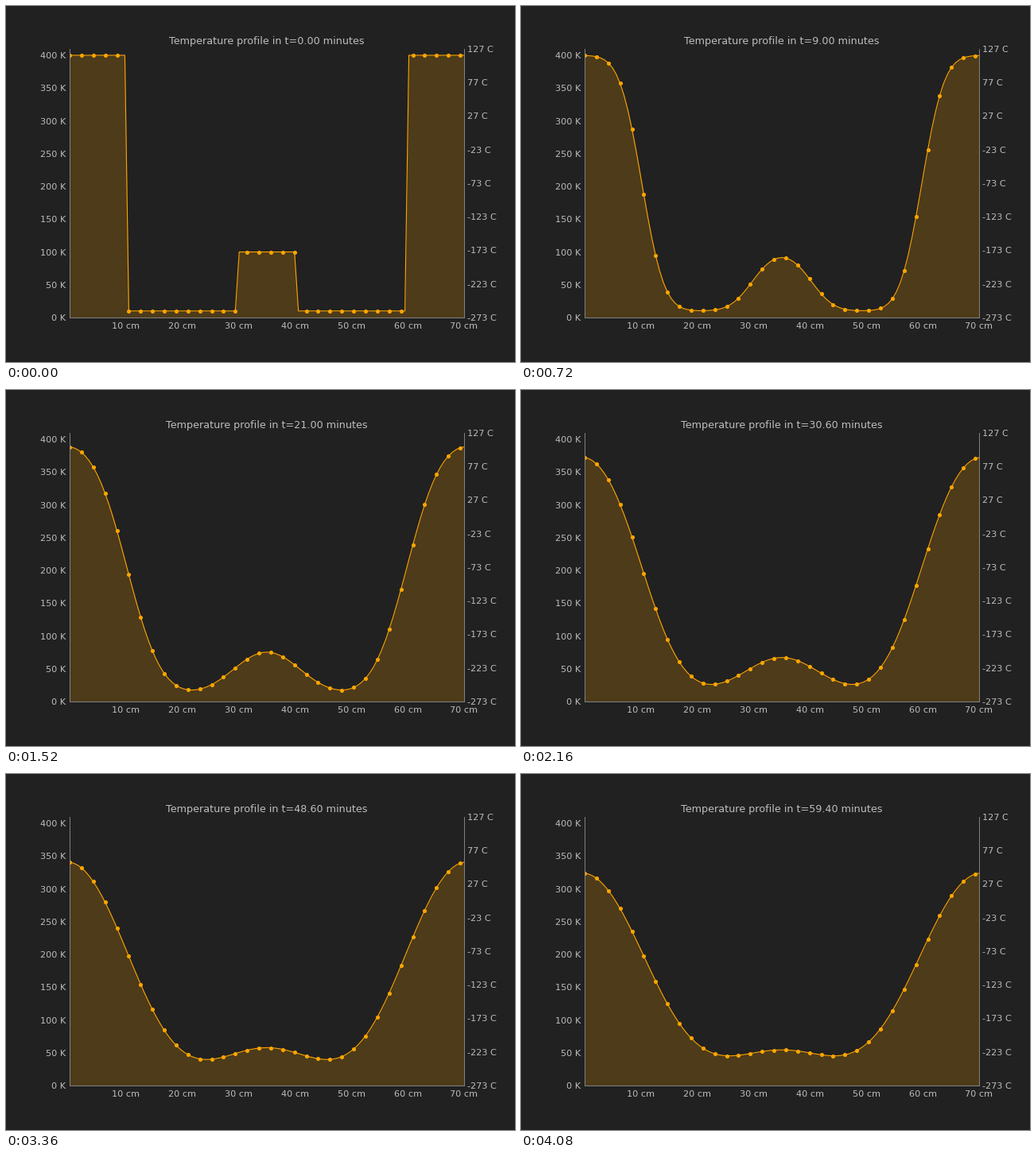
A matplotlib script that plays this animation: 640 by 448 pixels, repeating every 4160 ms.

```python
import numpy as np
import matplotlib.pyplot as plt
from matplotlib.animation import FuncAnimation

BG, TEXT, AXIS, HOT = "#212121", "#bdbdbd", "#8c8c8c", "orange"
FRAMES, INTERVAL = 52, 80
STEP = 0.6           # minutes per simulation step
DIFFUSIVITY = 0.553  # cm^2 per minute
DX = 0.7             # cm

plt.rcParams["font.family"] = "DejaVu Sans"

# Rod: hot ends, a warm middle, cold elsewhere
x = np.arange(101) * DX
start = np.full(x.size, 10.0)
start[(x > 30) & (x < 40)] = 100
start[(x < 10) | (x > 60)] = 400

# Heat equation with insulated ends, solved through its eigenmodes
lap = np.diag(np.full(x.size, -2.0))
lap += np.eye(x.size, k=1) + np.eye(x.size, k=-1)
lap[0, 0] = lap[-1, -1] = -1
rates, modes = np.linalg.eigh(lap * DIFFUSIVITY / DX**2)
weights = modes.T @ start


def minutes(i):
    return STEP * (i if i <= 3 else 2 * i - 3)


def temperature(t):
    return start if t == 0 else modes @ (weights * np.exp(rates * t))


def area(u):
    return np.column_stack([np.r_[x[0], x, x[-1]], np.r_[0, u, 0]])


fig = plt.figure(figsize=(8, 5.6), dpi=80, facecolor=BG)
ax = fig.add_axes([0.125, 0.125, 0.775, 0.755], facecolor=BG)
celsius = ax.twinx()

ax.set_xlim(0, 70)
ax.set_ylim(0, 410)
celsius.set_ylim(-273, 127)


def label_ticks(axis, values, unit):
    axis.set_ticks(values, [f"{v} {unit}" for v in values])


label_ticks(ax.xaxis, range(10, 71, 10), "cm")
label_ticks(ax.yaxis, range(0, 401, 50), "K")
label_ticks(celsius.yaxis, range(-273, 128, 50), "C")

style = dict(length=0, labelsize=10.1, labelcolor=TEXT)
ax.tick_params(axis="x", pad=5.2, **style)
ax.tick_params(axis="y", pad=4, **style)
celsius.tick_params(axis="y", pad=4, **style)

for a, shown in ((ax, ("left", "bottom")), (celsius, ("right",))):
    for side, spine in a.spines.items():
        spine.set_visible(side in shown)
        spine.set_color(AXIS)
        spine.set_linewidth(0.8)

title = ax.set_title("", fontsize=11.5, color=TEXT, pad=5.6)
fill = ax.fill_between(x, start, color=HOT, alpha=0.2, linewidth=0)
line, = ax.plot(x, start, color=HOT, lw=1, marker="o", markevery=3,
                markersize=4.6, markeredgewidth=0)


def draw(i):
    t = minutes(i)
    u = temperature(t)
    line.set_ydata(u)
    fill.set_verts([area(u)])
    title.set_text(f"Temperature profile in t={t:.2f} minutes")
    return line, fill, title


anim = FuncAnimation(fig, draw, frames=FRAMES, interval=INTERVAL,
                     init_func=lambda: draw(0), repeat=True, repeat_delay=0)
plt.show()
```
